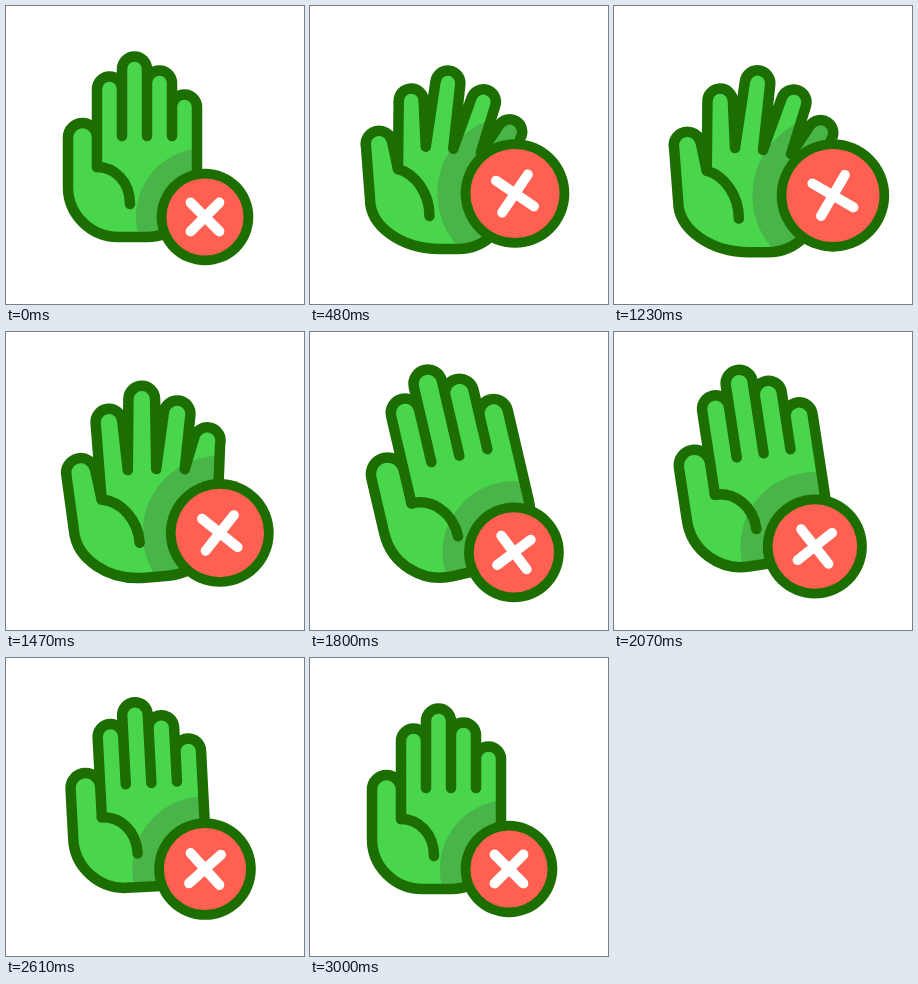
Write an HTML page with a canvas that moves like this. It is 298 px wide and 298 px high and loops after 3.15 s.

```html
<!DOCTYPE html>
<html lang="en">
<head>
<meta charset="utf-8">
<title>Hand with cross badge</title>
<style>
  html, body { margin: 0; width: 100%; height: 100%; overflow: hidden; background: #fff; }
  canvas { display: block; width: 298px; height: 298px; }
</style>
</head>
<body>
<canvas id="stage"></canvas>
<script>
const SIZE = 298, LOOP = 3150, STEP = 30, LINE = 10;
const DARK = '#1c6e00', GREEN = '#49d64d', SHADE = '#49b549', RED = '#ff6052';
const PIVOT = { x: 118, y: 124 };
const FINGERS = [47, 67, 53, 29]; // lengths, index to little finger

// open: how far the fingers fan out; the rest moves the hand and the badge
const rest = { open: 0, dx: 0, dy: 0, tilt: 0, scale: 1, bx: 199, by: 211, br: 48, turn: 0 };
const fanned = { ...rest, open: 1, bx: 205, by: 187.5, br: 54, turn: -11 };
const drifted = { ...fanned, dx: 5.5, dy: 1, scale: 1.02, bx: 219.5, by: 189.5, br: 56, turn: -15 };
const leaning = { ...rest, dx: 4, dy: -1, tilt: -13.2, scale: 1.15, bx: 204, by: 220.5, br: 49.5, turn: 8 };
const settled = { ...rest, dx: 7, dy: -8, tilt: -6, scale: 1.05, br: 53, turn: 6 };

const linear = u => u;
const smooth = u => u * u * (3 - 2 * u);
const timeline = [
  { at: 0, pose: rest },
  { at: 180, pose: rest, ease: linear },
  { at: 480, pose: fanned, ease: smooth },
  { at: 1260, pose: drifted, ease: linear },
  { at: 1770, pose: leaning, ease: smooth },
  { at: 2280, pose: settled, ease: smooth },
  { at: 2940, pose: rest, ease: smooth },
  { at: LOOP, pose: rest, ease: linear }
];

const lerp = (a, b, u) => a + (b - a) * u;
const rad = deg => deg * Math.PI / 180;

function poseAt(t) {
  const i = timeline.findIndex(k => k.at > t);
  const from = timeline[i - 1], to = timeline[i];
  const u = to.ease((t - from.at) / (to.at - from.at));
  const pose = {};
  for (const key in rest) pose[key] = lerp(from.pose[key], to.pose[key], u);
  return pose;
}

const canvas = document.getElementById('stage');
const ctx = canvas.getContext('2d');
const dpr = window.devicePixelRatio || 1;
canvas.width = canvas.height = Math.round(SIZE * dpr);
const toStage = () => ctx.setTransform(dpr, 0, 0, dpr, 0, 0);

function toHand({ dx, dy, tilt, scale }) {
  toStage();
  ctx.translate(PIVOT.x + dx, PIVOT.y + dy);
  ctx.rotate(rad(tilt));
  ctx.scale(scale, scale);
  ctx.translate(-PIVOT.x, -PIVOT.y);
}

function handPaths(open) {
  const at = (a, b) => lerp(a, b, open);
  const knuckle = j => [at(103.5, 102) + j * at(25, 27.5), at(130, 140.5 + j * j)];
  const web = [at(91, 88), at(161, 163)];
  const left = at(62, 60), right = at(191, 198), bottom = at(231, 243);
  const rx = at(50, 70), k = 0.45; // palm corner radius and handle inset

  const body = new Path2D();
  const tip = (x, y, r, lean) => body.arc(x, y, r, lean + Math.PI, lean + 2 * Math.PI);
  body.moveTo(left, bottom - 50);
  tip(at(76.5, 69), at(131.5, 138), at(14.5, 13.3), rad(at(0, -13)));
  body.lineTo(...web);
  FINGERS.forEach((length, j) => {
    const [x, y] = knuckle(j);
    const lean = rad(at(0, 7 * j + 1.4 * j * j - 1));
    const reach = length * at(1, 0.97);
    tip(x + reach * Math.sin(lean), y - reach * Math.cos(lean), 12.5, lean);
    if (j < 3) body.lineTo(...knuckle(j + 0.5));
  });
  body.lineTo(right, bottom - 50);
  body.bezierCurveTo(right, bottom - 50 * k, right - 50 * k, bottom, right - 50, bottom);
  body.lineTo(left + rx, bottom);
  body.bezierCurveTo(left + rx * k, bottom, left, bottom - 50 * k, left, bottom - 50);
  body.closePath();

  const endX = at(124, 119.5), endY = at(198, 210);
  const crease = new Path2D();
  crease.moveTo(...web);
  crease.bezierCurveTo(web[0] + 18, web[1] + at(0, 5), endX, endY - 22, endX, endY);
  return { body, crease };
}

function disc(x, y, r, color) {
  ctx.beginPath();
  ctx.arc(x, y, r, 0, 2 * Math.PI);
  ctx.fillStyle = color;
  ctx.fill();
}

function drawHand(pose) {
  const { body, crease } = handPaths(pose.open);
  ctx.save();
  toHand(pose);
  ctx.fillStyle = GREEN;
  ctx.fill(body);
  ctx.clip(body);
  toStage();
  disc(pose.bx, pose.by, pose.br * 1.44, SHADE);
  ctx.restore();

  toHand(pose);
  ctx.strokeStyle = DARK;
  ctx.lineWidth = (LINE + 0.5) / pose.scale;
  ctx.stroke(body);
  ctx.stroke(crease);
  toStage();
}

function drawBadge({ bx, by, br, turn }) {
  disc(bx, by, br + 0.3, DARK);
  disc(bx, by, br - 9.4, RED);
  ctx.translate(bx, by);
  ctx.rotate(rad(turn));
  const arm = br * 0.3;
  ctx.beginPath();
  for (const side of [-1, 1]) {
    ctx.moveTo(-arm, -arm * side);
    ctx.lineTo(arm, arm * side);
  }
  ctx.strokeStyle = '#fff';
  ctx.lineWidth = LINE;
  ctx.stroke();
  toStage();
}

function draw(ms) {
  const pose = poseAt(Math.floor((ms % LOOP) / STEP) * STEP);
  toStage();
  ctx.fillStyle = '#fff';
  ctx.fillRect(0, 0, SIZE, SIZE);
  ctx.lineCap = ctx.lineJoin = 'round';
  drawHand(pose);
  drawBadge(pose);
}

const start = performance.now();
function tick() {
  draw(Math.max(0, performance.now() - start));
  requestAnimationFrame(tick);
}
tick();
</script>
</body>
</html>
```
